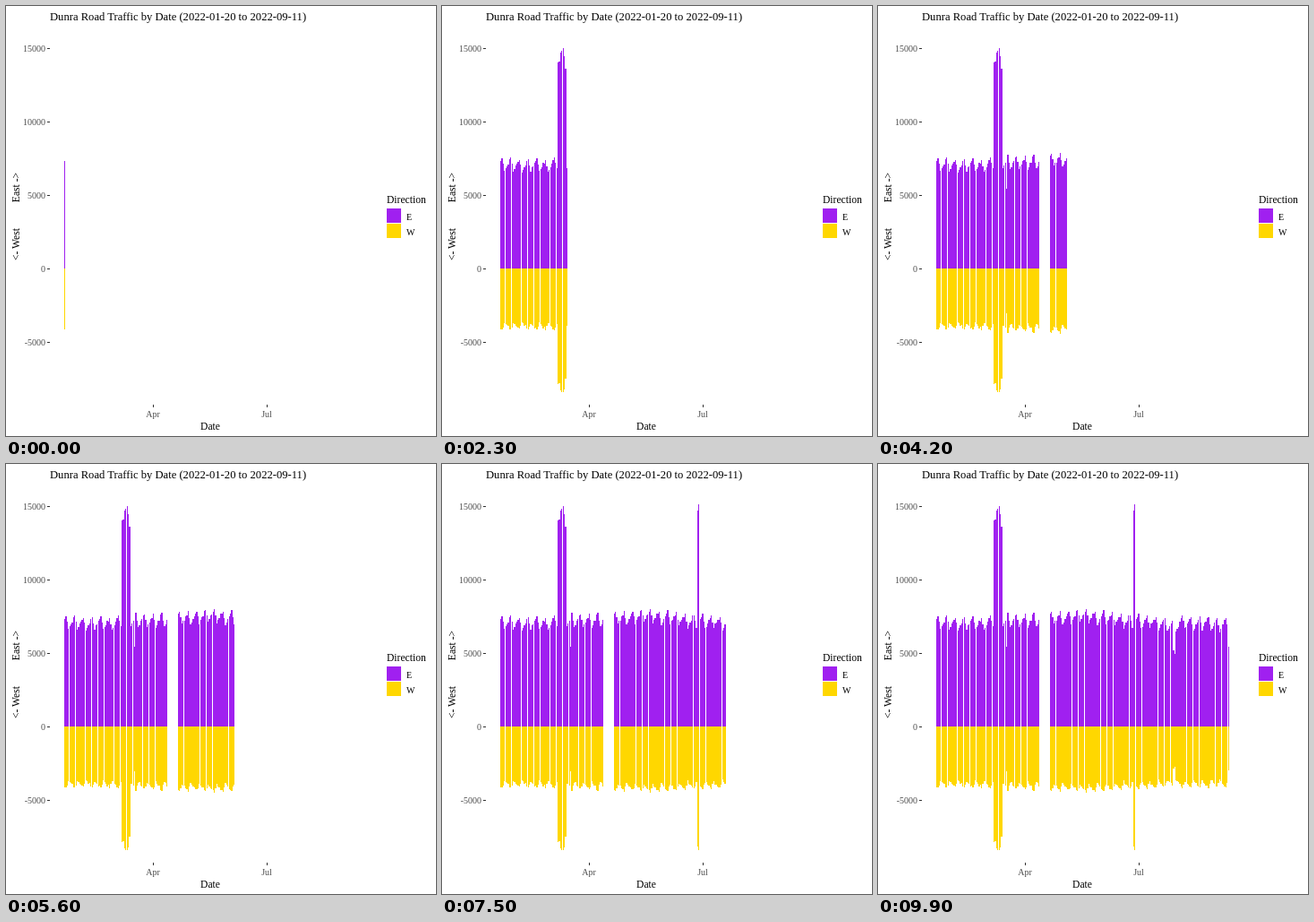
Animation of 480 by 480 pixels, one loop 10 s. Source, as an HTML page with a canvas:

```html
<!DOCTYPE html>
<html lang="en">
<head>
<meta charset="utf-8">
<title>Traffic by date</title>
<style>
  html, body { margin: 0; width: 100%; height: 100%; overflow: hidden; background: #fff; }
  svg, canvas { position: absolute; left: 0; top: 0; width: 480px; height: 480px; }
  text { font-family: "Liberation Serif", "Times New Roman", serif; font-size: 11.6px; white-space: pre; }
  .title { font-size: 12.61px; }
  .tick { font-size: 10px; fill: #4d4d4d; }
  .key { font-size: 10px; }
  .end { text-anchor: end; }
  .mid { text-anchor: middle; }
  .marks { stroke: #333; fill: none; shape-rendering: crispEdges; }
</style>
</head>
<body>
<svg viewBox="0 0 480 480">
  <text class="title" x="49" y="16">Dunra Road Traffic by Date (2022-01-20 to 2022-09-11)</text>
  <path class="marks" d="M46 47.5h3M46 129.5h3M46 211.5h3M46 293.5h3M46 375.5h3M164.5 445v3M291.5 445v3"/>
  <g class="end">
    <text class="tick" x="44" y="51">15000</text>
    <text class="tick" x="44" y="133">10000</text>
    <text class="tick" x="44" y="215">5000</text>
    <text class="tick" x="44" y="297">0</text>
    <text class="tick" x="44" y="379">-5000</text>
  </g>
  <g class="mid">
    <text class="tick" x="164" y="459">Apr</text>
    <text class="tick" x="291" y="459">Jul</text>
    <text x="228" y="473">Date</text>
    <text transform="translate(15 235) rotate(-90)">&lt;- West          East -&gt;</text>
  </g>
  <text x="425" y="220">Direction</text>
  <rect x="425" y="226" width="16" height="16" fill="#a020f0"/>
  <rect x="425" y="243" width="16" height="16" fill="#ffd700"/>
  <text class="key" x="447" y="239">E</text>
  <text class="key" x="447" y="256">W</text>
</svg>
<canvas id="bars" width="480" height="480"></canvas>
<script>
  const ctx = document.getElementById('bars').getContext('2d');
  const LEFT = 65.4855, PITCH = 1.3912, BAR = 0.9, ZERO = 293.5, SCALE = 0.0164;
  const STEP = 100, STEPS = 100;
  const RECORDED = 227, GAP_START = 83, GAP_DAYS = 8;

  // Unusual spells of traffic
  const spells = [
    { from: 46, to: 52, factor: 2 },
    { from: 56, to: 56, factor: 0.73 },
    { from: 158, to: 159, factor: 2.1 },
    { from: 190, to: 191, factor: 0.7 },
    { from: 234, to: 234, factor: 0.85 }
  ];

  // Seeded noise from -1 to 1
  function noise(n) {
    const v = Math.sin(n * 12.9898 + 4.1) * 43758.5453;
    return (v - Math.floor(v)) * 2 - 1;
  }

  // Traffic climbs from Sunday to Friday, drops on Saturday, and swells in spring
  function counts(day) {
    const week = Math.floor(day / 7);
    const sinceSunday = (day + 4) % 7;
    const peak = 7480 + 480 * Math.exp(-(((week - 15) / 6) ** 2)) + 120 * noise(week + 300);
    const dip = sinceSunday === 6 ? 450 : 180 * (5 - sinceSunday);
    const spell = spells.find(s => day >= s.from && day <= s.to);
    const east = (peak - dip + 100 * noise(day)) * (spell ? spell.factor : 1);
    return [east, east * (0.56 + 0.01 * noise(day + 500))];
  }

  function box(color, x0, y0, x1, y1) {
    ctx.fillStyle = color;
    ctx.fillRect(x0, y0, x1 - x0, y1 - y0);
  }

  function draw(step) {
    const base = Math.floor(ZERO);
    const last = Math.floor(step * (RECORDED - 1) / (STEPS - 1) + 0.8);
    ctx.clearRect(0, 0, 480, 480);
    for (let i = 0; i <= last; i++) {
      const day = i < GAP_START ? i : i + GAP_DAYS;
      const [east, west] = counts(day);
      const x0 = Math.floor(LEFT + PITCH * day);
      const x1 = Math.floor(LEFT + PITCH * (day + BAR));
      box('#a020f0', x0, Math.floor(ZERO - east * SCALE), x1, base);
      box('#ffd700', x0, base, x1, Math.floor(ZERO + west * SCALE));
    }
  }

  let shown = -1;
  function tick() {
    const step = Math.floor(performance.now() / STEP) % STEPS;
    if (step !== shown) draw(shown = step);
    requestAnimationFrame(tick);
  }
  tick();
</script>
</body>
</html>
```
